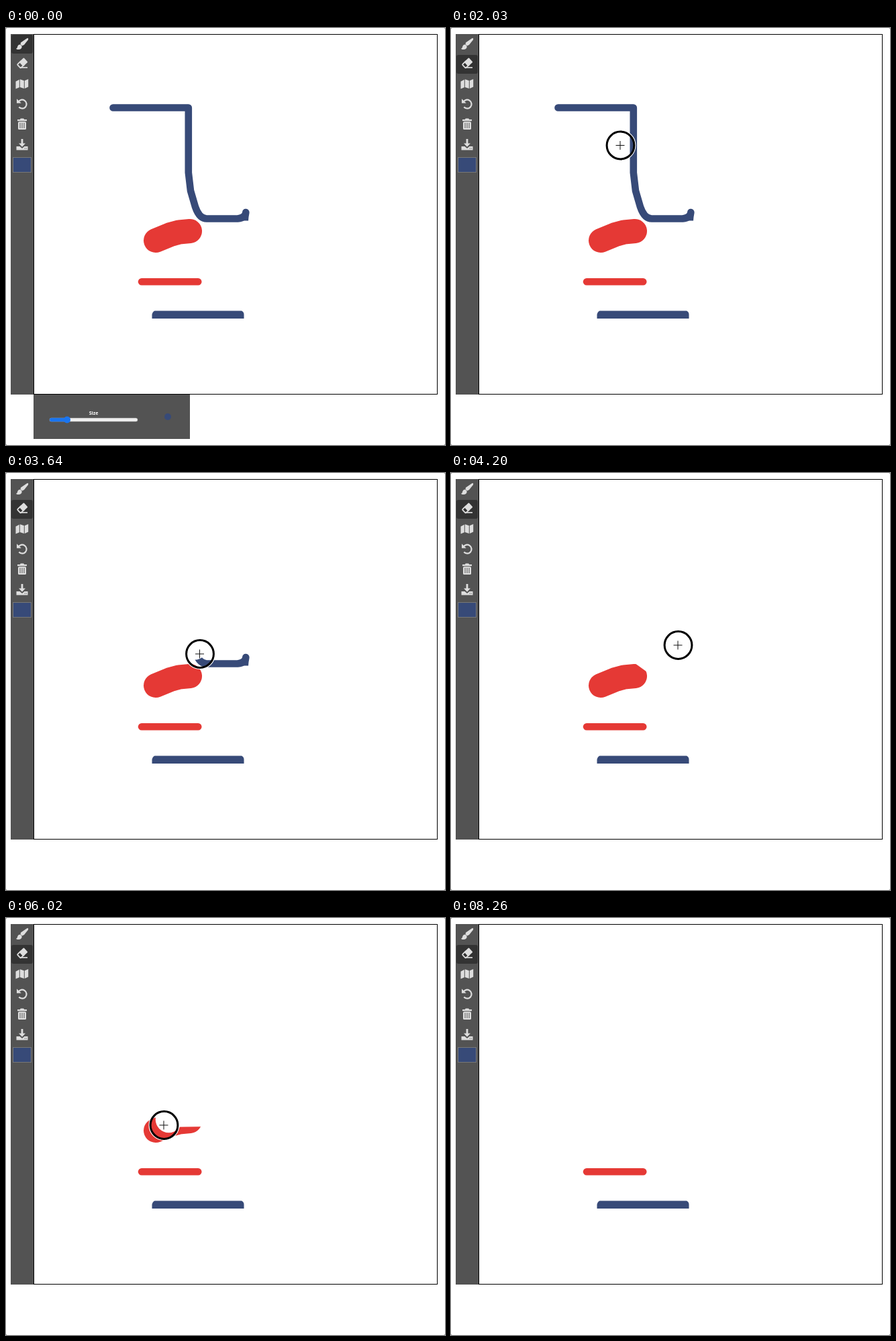
Recreate the animation shown at these times as an HTML page. Size 654 px wide and 620 px high, loop 8540 ms.

```html
<!DOCTYPE html>
<html lang="en">
<head>
<meta charset="utf-8">
<title>Eraser demo</title>
<style>
html, body { margin: 0; width: 100%; height: 100%; overflow: hidden; background: #fff; }
svg { display: block; width: 654px; height: 620px; }
.label { font: 700 7px "Open Sans", "Noto Sans", sans-serif; fill: #fff; }
.round { fill: none; stroke-linecap: round; stroke-linejoin: round; }
</style>
</head>
<body>
<svg viewBox="0 0 654 620">
  <rect width="654" height="620" fill="#888"/>
  <rect width="654" height="620" rx="2" fill="#fff"/>

  <!-- drawing -->
  <path class="round" stroke="#374a78" stroke-width="10.6" d="M159.5 118.5H271.8V215L275 242L282 266Q288 283.5 299 283.5H345Q357 282 357.3 274"/>
  <path fill="#374a78" d="M353 275h9l-1 11.5h-8z"/>
  <path class="round" stroke="#e53935" stroke-width="36" d="M223 316L245 307L258 303.5L274 302"/>
  <path class="round" stroke="#e53935" stroke-width="10.4" d="M202 377.2H286.3"/>
  <path fill="#374a78" d="M217.5 432v-6q1-4.500 4-5.500H351q3.500 1.500 3.500 5.500v6z"/>
  <g id="trails" class="round" stroke="#fff" stroke-width="39.6">
    <path/><path/><path/>
  </g>
  <rect x="41.5" y="9.5" width="601" height="535" fill="none" stroke="#000"/>

  <!-- toolbar -->
  <rect x="7" y="9" width="34" height="536" fill="#535353"/>
  <rect id="active" x="8" width="32" height="28" rx="3" fill="#333"/>
  <g fill="#dedede" stroke="#dedede" stroke-width="0">
    <path d="M31 15.500q3-1.500 2 2L27 25l-3 1.500-2.700-2.500 1.300-2.700z"/>
    <path d="M20.400 24.600q3 .5 3.300 3.500-.5 4-5.300 4-3 0-3.400-1.600 2-.5 2.200-3 .5-2.500 3.200-2.900z"/>
    <g transform="translate(24 52.500) rotate(-43)">
      <rect x="-2" y="-4.500" width="9.500" height="9" rx="1"/>
      <rect x="-6.500" y="-3.600" width="8" height="7.200" rx="1" fill="none" stroke-width="1.800"/>
    </g>
    <path d="M21 58.800H32" stroke-width="1.700"/>
    <path d="M14.500 79.500l5.300-2.700v11.400l-5.300 2.300zM20.800 76.300l6 2V90l-6-2zM27.800 78.300l5.400-2.300v11.500L27.800 90z"/>
    <path d="M16 105.300l6.700 6.500H16z"/>
    <path d="M18.300 110.200A6.500 6.500 0 1 1 19.300 117.600" fill="none" stroke-width="2.200"/>
    <path d="M17 136h3.800l1-1.600h4.400l1 1.600H31v2.300H17z"/>
    <rect x="18" y="139.300" width="12" height="11.700" rx="1.600"/>
    <path d="M21 141v8M24 141v8M27 141v8" stroke="#535353" stroke-width="1"/>
    <path d="M22.600 165h2.800v6.500h3.600l-5 5.300-5-5.300h3.600z"/>
    <path d="M15.500 176h5l3.500 3 3.500-3h5v5.500h-17z"/>
    <path d="M27.500 179h1.200M29.700 179h1.200" stroke="#535353" stroke-width="1.200"/>
  </g>
  <rect x="10.5" y="192.500" width="27" height="22" fill="#374a78" stroke="#777"/>

  <!-- size panel -->
  <g id="panel">
    <rect x="41" y="545" width="233" height="66" fill="#535353"/>
    <text class="label" x="130.500" y="575" text-anchor="middle">Size</text>
    <rect x="65" y="580" width="131" height="5" rx="2.500" fill="#efefef" stroke="#bbb" stroke-width=".5"/>
    <rect x="65" y="579.700" width="27" height="5.600" rx="2.800" fill="#1a75f0"/>
    <circle cx="91" cy="582.500" r="5" fill="#1a75f0"/>
    <circle cx="241" cy="578" r="5" fill="#374a78"/>
  </g>

  <!-- pointer -->
  <g id="pointer">
    <g id="ring" fill="none">
      <circle cx=".5" r="22.300" stroke="#fff" stroke-width="1.400"/>
      <circle cx=".5" r="20.400" stroke="#000" stroke-width="3"/>
    </g>
    <path id="cross" d="M-6.500 0H6.500M0-6.500V6.500" stroke="#111"/>
    <path id="hand" fill="#fff" stroke="#111" stroke-linejoin="round" d="M-2.500-6q1.500-2 2.700 0l1.200 4q2-1 2.500 0 1.500-.8 2 .6 2-.4 2 2 .6 3-.6 4.500v3H-.5q-1-2.500-3.600-4.300-2-2 0-2.600l2.400 1z"/>
    <path id="arrow" stroke="#fff" d="M0 0v14l3.300-3 2.300 5 2.200-1-2.200-4.800H10z"/>
  </g>
</svg>
<script>
const LOOP = 8540, STEP = 70;
const $ = id => document.getElementById(id);
const trails = [...$("trails").children];

// Legs of the pointer's way: time, x, y. It rests between legs.
const toTools = [[70, 345, 594], [210, 338, 520], [910, 12, 36], [1260, 23, 59]];
const toCanvas = [[1750, 24, 60], [1960, 338, 247], [2100, 166, 102]];
const wipeTop = [
  [2450, 165, 102], [2520, 168, 112], [2660, 214, 113], [2730, 236, 104],
  [2800, 238.5, 104], [3010, 263, 122], [3360, 266, 150]
];
const wipeBend = [
  [3570, 281, 258], [3640, 288.5, 269], [3710, 301, 278],
  [3850, 332, 284], [3990, 358, 284], [4200, 338, 256]
];
const dab = [[4340, 338, 256], [4690, 251, 161], [4760, 251, 161], [4970, 239, 122]];
const wipeBlob = [
  [5110, 239, 122], [5180, 239.5, 131.5], [5460, 364, 232], [5600, 322, 290],
  [5880, 250, 291], [6020, 235, 308], [6230, 200, 318], [6580, 225, 335],
  [6720, 236.5, 303], [6790, 250, 308], [7140, 291, 322]
];
const leave = [[7210, 291, 322], [7490, 233, 344], [7770, 233, 344], [8190, 342, 600]];
const route = [toTools, toCanvas, wipeTop, wipeBend, dab, wipeBlob, leave].flat();

const presses = [[2450, 4200], [4970, 4970], [5600, 7140]];
const rings = [[1890, 4970], [5250, 7490]];

function place(t) {
  const i = route.findIndex(k => k[0] > t);
  if (i < 0) return route.at(-1).slice(1);
  if (i === 0) return route[0].slice(1);
  const [t0, x0, y0] = route[i - 1], [t1, x1, y1] = route[i];
  const u = (t - t0) / (t1 - t0);
  return [x0 + (x1 - x0) * u, y0 + (y1 - y0) * u];
}

// Erasing trails one step behind the pointer.
function trail([start, end], t) {
  const points = [];
  for (let s = start; s <= Math.min(end, t - STEP); s += STEP) points.push(place(s).join(" "));
  return points.length ? "M" + points.join("L") + "l0 .01" : "";
}

function show(id, on) {
  $(id).style.display = on ? "" : "none";
}

function render(now) {
  const t = Math.floor((now % LOOP) / STEP) * STEP;
  const [x, y] = place(t);
  const erasing = t >= 1540;
  const inTools = x < 42, below = y > 545;

  $("active").setAttribute("y", erasing ? 40 : 10);
  show("panel", !erasing);
  trails.forEach((path, i) => path.setAttribute("d", trail(presses[i], t)));

  show("pointer", t >= 70 && t < 8260);
  $("pointer").setAttribute("transform", `translate(${x} ${y})`);
  show("hand", inTools);
  show("arrow", below);
  show("cross", !inTools && !below);
  show("ring", rings.some(([a, b]) => t >= a && t <= b));
}

const begin = performance.now();
function tick() {
  render(performance.now() - begin);
  requestAnimationFrame(tick);
}
tick();
</script>
</body>
</html>
```
